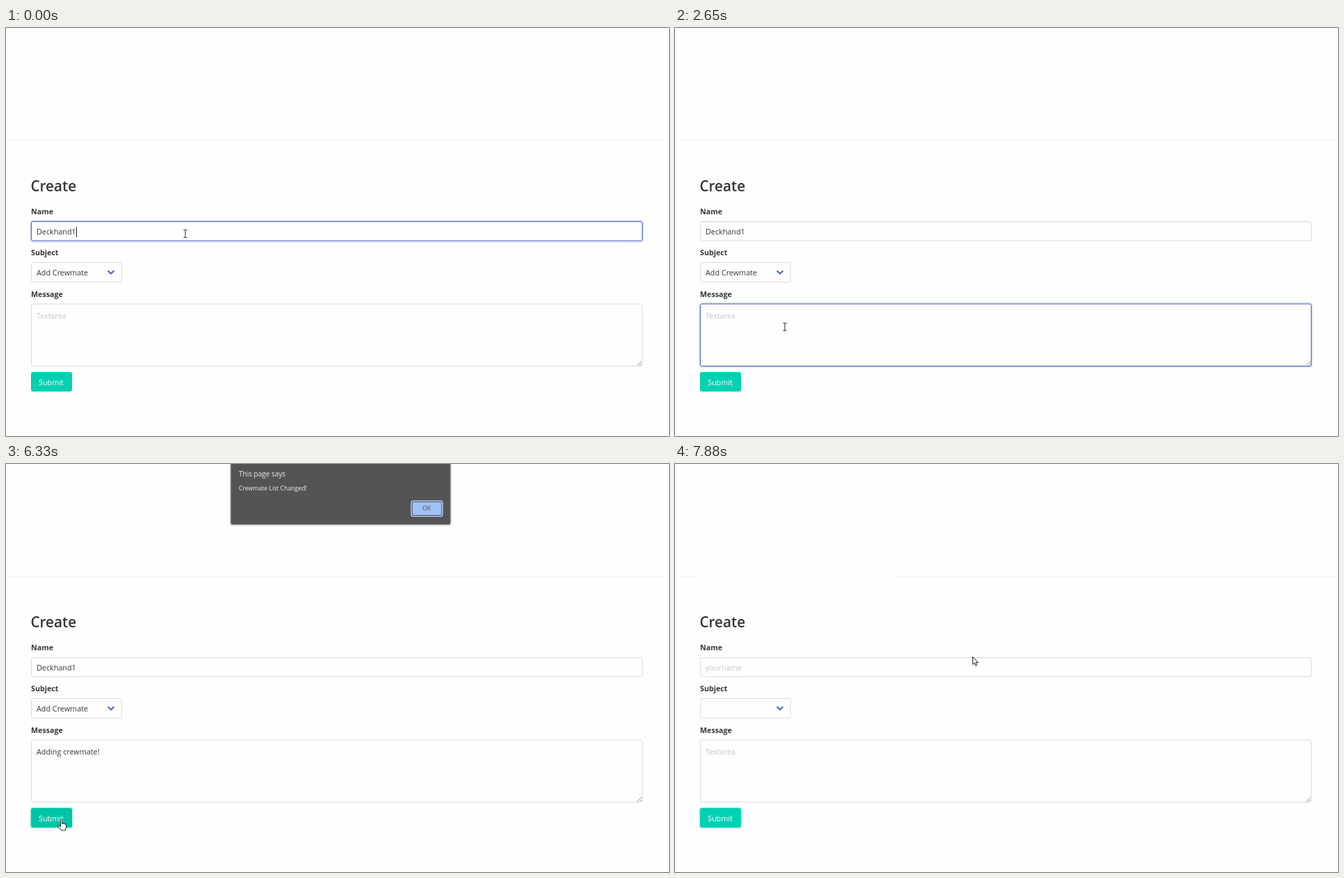
Write an HTML page that moves like this. It is 954 by 587 pixels and loops after 8 s.

```html
<!DOCTYPE html>
<html lang="en">
<head>
<meta charset="utf-8">
<title>Create form</title>
<style>
  html, body { margin: 0; width: 100%; height: 100%; overflow: hidden; background: #fefefe; }
  svg { display: block; width: 954px; height: 587px; font: 10.8px "Open Sans", "Noto Sans", sans-serif; }
  text { fill: #363636; white-space: pre; }
  .title { font-size: 20.7px; font-weight: 600; }
  .label { font-size: 10.7px; font-weight: 700; }
  .hint { fill: #c5c5c5; }
  .light { fill: #fff; }
  .box { fill: #fefefe; stroke: #dbdbdb; }
  .inset { stroke: #f5f5f5; }
  .ring { fill: none; stroke: #485fc7; stroke-opacity: .25; stroke-width: 1.5; }
  .focus .box { stroke: #485fc7; }
  .field:not(.focus) .ring { display: none; }
  .focus .inset { display: none; }
  .chevron { fill: none; stroke: #485fc7; stroke-width: 2; stroke-linecap: round; stroke-linejoin: round; }
  .grip { fill: none; stroke: #8a8a8a; }
  #cursors g { stroke: #222; fill: #fff; stroke-linejoin: round; }
</style>
</head>
<body>
<svg viewBox="0 0 954 587">
  <path d="M0 161.5H954" stroke="#f1f1f1"/>
  <path id="gap" d="M37 161.5H320" stroke="#fefefe" stroke-width="2"/>

  <text class="title" x="35.5" y="235">Create</text>
  <text class="label" x="36" y="268">Name</text>
  <text class="label" x="36" y="327">Subject</text>
  <text class="label" x="36" y="387">Message</text>

  <g class="field" id="name">
    <rect class="ring" x="35.25" y="277.25" width="881.5" height="30.5" rx="3.5"/>
    <rect class="box" x="36.5" y="278.5" width="879" height="27.5" rx="2.5"/>
    <path class="inset" d="M38 279.5H914"/>
    <text id="nameText" x="44" y="297"></text>
  </g>

  <g class="field" id="subject">
    <rect class="ring" x="35.25" y="336.25" width="132.5" height="30.5" rx="3.5"/>
    <rect class="box" x="36.5" y="337.5" width="130" height="28" rx="2.5"/>
    <text id="choice" x="44" y="356">Add Crewmate</text>
    <path class="chevron" id="chevron" d="M147.2 349.7l3.8 3.8 3.8-3.8"/>
  </g>

  <g class="field" id="message">
    <rect class="ring" x="35.25" y="395.75" width="881.5" height="92" rx="3.5"/>
    <rect class="box" x="36.5" y="397" width="879" height="89.5" rx="2.5"/>
    <path class="inset" d="M38 398.3H914"/>
    <path class="grip" d="M908.5 485.5l6-6M912 485.5l2.5-2.5"/>
    <text id="messageText" x="44" y="418"></text>
  </g>

  <rect id="caret" width="1" height="15" fill="#222"/>

  <rect id="submitRing" x="35.25" y="494.25" width="60.5" height="29.5" rx="3.5" fill="none" stroke="#00d1b2" stroke-opacity=".3" stroke-width="1.5"/>
  <rect id="submit" x="36" y="495" width="59" height="28" rx="2.8"/>
  <text class="light" x="47" y="514">Submit</text>

  <g id="popup">
    <g fill-opacity=".045">
      <rect x="23" y="369" width="157" height="64" rx="22"/>
      <rect x="28" y="367" width="147" height="59" rx="18"/>
      <rect x="32" y="366" width="139" height="51" rx="13"/>
      <rect x="35" y="366" width="133" height="40" rx="8"/>
    </g>
    <rect x="36.5" y="366" width="130" height="31.5" rx="3" fill="#fff" stroke="#a9a9a9"/>
    <path d="M37 366.5H166V382H37Z" fill="#1e90ff"/>
    <text class="light" x="44.5" y="378">Add Crewmate</text>
    <text x="44.5" y="394" font-size="10.7">Remove Crewmate</text>
  </g>

  <g id="alert">
    <rect x="322" y="-5" width="319" height="94" rx="4" fill-opacity=".22"/>
    <rect x="323.5" y="-5" width="316" height="92" rx="3" fill="#292a2d"/>
    <text x="335" y="18" font-size="10" style="fill:#e8eaed">This page says</text>
    <text x="335" y="38" font-size="8.7" style="fill:#f1f3f4">Crewmate List Changed!</text>
    <rect x="583.2" y="53.2" width="45" height="22.2" rx="3" fill="none" stroke="#a9c8fa" stroke-width="1.4"/>
    <rect x="585" y="55" width="41.5" height="18.6" rx="1.5" fill="#8ab4f8"/>
    <text x="605.3" y="67" font-size="8.7" text-anchor="middle" style="fill:#202124">OK</text>
  </g>

  <g id="cursors">
    <g id="beam"><path fill="none" d="M-2.5-5.5H-.8L0-5 .8-5.5H2.5M0-5V5M-2.5 5.5H-.8L0 5 .8 5.5H2.5"/></g>
    <g id="arrow"><path d="M.5.5V11.6L3 9.3 4.7 13.2 6.5 12.4 4.8 8.6H8.2Z"/></g>
    <g id="hand"><path d="M4.5 9.5V2A1.15 1.15 0 0 1 6.8 2V6.8A1 1 0 0 1 8.8 7 1 1 0 0 1 10.8 7.5 .9 .9 0 0 1 12.5 8.2V12L11.3 16H5.6L1 10.6C.3 9.5 1.6 8.4 2.6 9.3L4.5 11Z"/></g>
  </g>
</svg>
<script>
const LOOP = 8000;
const $ = id => document.getElementById(id);
const show = (id, on) => { $(id).style.display = on ? "" : "none"; };
const within = (t, a, b) => t >= a && t < b;

// The screen is refreshed in steps: each entry holds until the next one.
const at = (keys, t) => keys.findLast(k => k[0] <= t);

const pointer = [
  [0, "beam", 258, 296], [400, "beam", 250, 298], [530, "beam", 222, 304],
  [650, "arrow", 176, 328], [780, "hand", 136, 347], [900, "hand", 132, 349],
  [1160, "hand", 126, 350], [1280, "arrow", 114, 367], [1410, "arrow", 108, 374],
  [1550, "arrow", 109, 374], [1840, "arrow", 124, 389], [1970, "beam", 150, 422],
  [2110, "beam", 158, 430], [5250, "beam", 151, 440], [5380, "beam", 126, 468],
  [5520, "arrow", 100, 490], [5650, "hand", 77, 508], [5790, "hand", 74, 511],
  [6740, "hand", 190, 430], [6890, "hand", 480, 250], [7040, "hand", 614, 144],
  [7170, "arrow", 612, 100], [7310, "arrow", 606, 66], [7590, "arrow", 602, 67],
  [7730, "arrow", 550, 140], [7880, "arrow", 428, 277]
];

const phrase = "Adding crewmate!";
const typed = [
  [0, 0], [3090, 1], [3230, 2], [3360, 4], [3500, 5], [3630, 7], [3770, 8],
  [4040, 11], [4180, 12], [4310, 13], [4570, 15], [4700, 16]
];

const dialog = [[0, 0], [6190, .35], [6330, .8], [6470, 1], [7730, .4], [7880, 0]];

function write(id, value, hint) {
  const el = $(id), text = value || hint;
  if (el.textContent !== text) el.textContent = text;
  el.classList.toggle("hint", !value);
}

function placeCaret(id, y, empty) {
  const width = empty ? 0 : $(id).getComputedTextLength();
  $("caret").setAttribute("x", Math.round(44 + width));
  $("caret").setAttribute("y", y);
}

function draw(t) {
  const reset = t >= 7730;
  const count = reset ? 0 : at(typed, t)[1];
  write("nameText", reset ? "" : "Deckhand1", "yourname");
  write("messageText", phrase.slice(0, count), "Textarea");
  show("choice", !reset);
  show("gap", reset);

  $("name").classList.toggle("focus", t < 900);
  $("subject").classList.toggle("focus", within(t, 900, 1970));
  $("message").classList.toggle("focus", within(t, 1970, 5790));
  $("chevron").style.stroke = within(t, 780, 1970) ? "#363636" : "";
  show("popup", within(t, 1030, 1840));

  show("caret", t < 400 || within(t, 2110, 2650) || within(t, 3090, 5250));
  if (t < 400) placeCaret("nameText", 286, false);
  else placeCaret("messageText", 406, !count);

  show("submitRing", t >= 5790);
  const pressed = within(t, 5790, 5920), hover = within(t, 5650, 7730);
  $("submit").style.fill = pressed ? "#00b89c" : hover ? "#00c4a7" : "#00d1b2";

  const alpha = at(dialog, t)[1];
  show("alert", alpha > 0);
  $("alert").style.opacity = alpha;

  const [, shape, x, y] = at(pointer, t);
  for (const id of ["beam", "arrow", "hand"]) show(id, id === shape);
  $(shape).setAttribute("transform", `translate(${x} ${y})`);
}

const start = performance.now();
function tick() {
  draw((performance.now() - start) % LOOP);
  requestAnimationFrame(tick);
}
tick();
</script>
</body>
</html>
```
